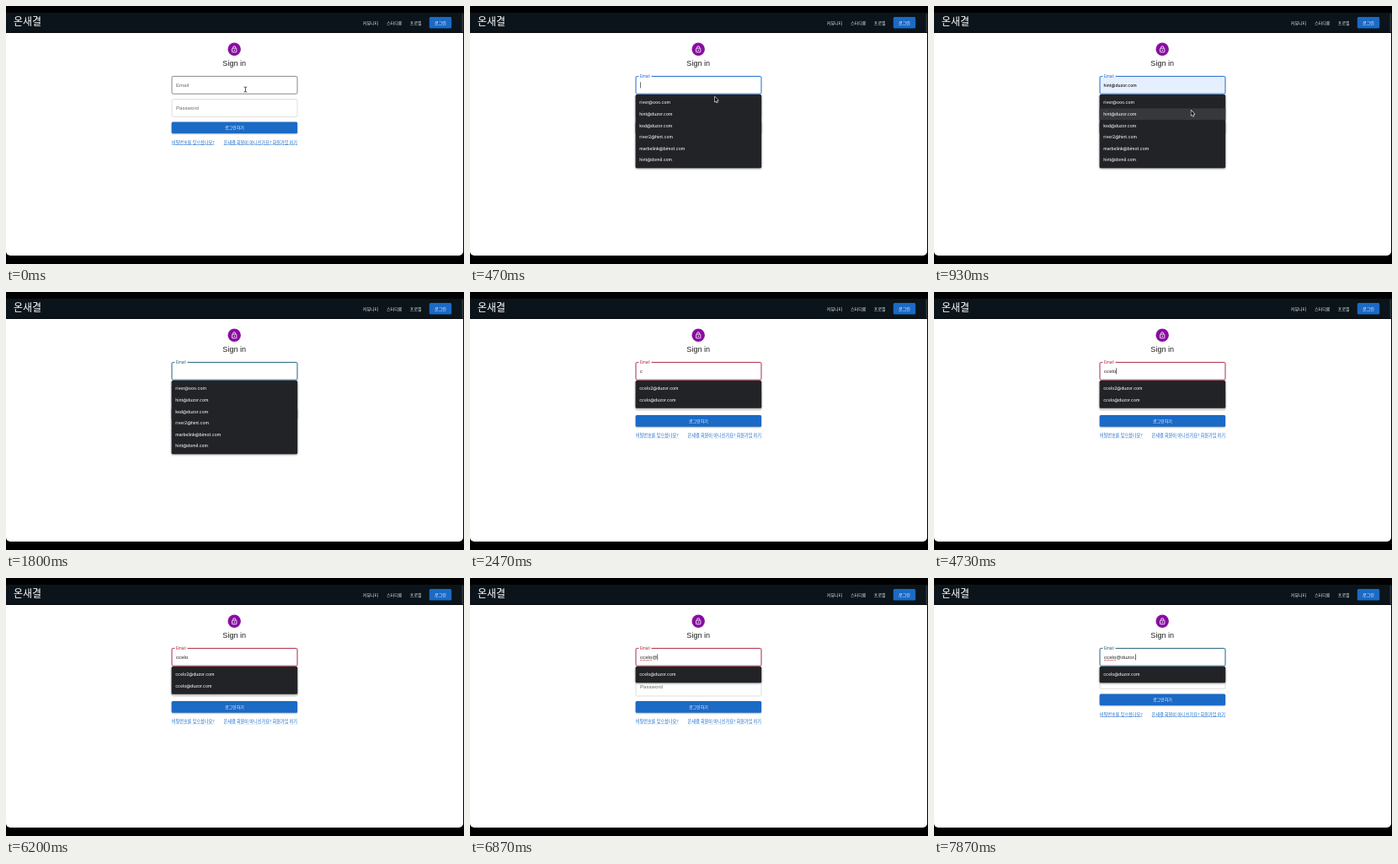
These frames come from a looping animation (544x306 px, 8000 ms). An HTML page with a canvas:

```html
<!DOCTYPE html>
<html lang="ko">
<head>
<meta charset="utf-8">
<title>Sign in</title>
<style>
html, body { margin: 0; width: 100%; height: 100%; overflow: hidden; background: #000; }
canvas { display: block; width: 544px; height: 306px; }
</style>
</head>
<body>
<canvas id="stage"></canvas>
<script>
const W = 544, H = 306, LOOP = 8000;
const canvas = document.getElementById('stage');
const ctx = canvas.getContext('2d');
const ratio = window.devicePixelRatio || 1;
canvas.width = W * ratio;
canvas.height = H * ratio;

const LATIN = '"Liberation Sans", Arial, sans-serif';
const MENU = 'Inter, "Liberation Sans", sans-serif';
const HANGUL = '"Noto Sans CJK KR", "Noto Sans CJK", sans-serif';
const BLUE = '#1b6ac6', TEAL = '#23627a', RED = '#ad2944';

const FOCUS = 270, OPEN = 330, REFRESH = 1670, FILTER = 1900;
const ERROR_ON = 2470, ERROR_OFF = 7750, SHIFT = 8.6;
const ADDRESS = 'ccelo@duzor.';
const KEYS = [1870, 2870, 3130, 4530, 4690, 6860, 7200, 7270, 7530, 7670, 7730, 7860];
const ALL = ['river@ooo.com', 'hint@duzor.com', 'ked@duzor.com',
  'river2@hint.com', 'marbelink@bimot.com', 'hint@domil.com'];
const MATCHES = ['ccelo2@duzor.com', 'ccelo@duzor.com'];
const FIELD = { x: 197, y: 83.4, w: 149, h: 20.8 };
const ROW = 13.6, MENU_TOP = 105;

// Pointer stops: time, x, y
const PATH = [[270, 284, 99], [480, 291, 108], [700, 302, 121], [930, 305, 124],
  [1000, 334, 118], [1070, 368, 110], [1200, 400, 108], [1330, 406, 108]];

const ease = p => p * p * (3 - 2 * p);
const clamp = v => Math.max(0, Math.min(1, v));
const mix = (a, b, p) => a + (b - a) * p;

function text(str, x, y, size, color, family = LATIN, opt = {}) {
  ctx.font = `${opt.weight || 400} ${size}px ${family}`;
  ctx.letterSpacing = (opt.spacing || 0) + 'px';
  ctx.textAlign = opt.align || 'left';
  ctx.textBaseline = 'alphabetic';
  ctx.fillStyle = color;
  ctx.fillText(str, x, y);
  return ctx.measureText(str).width;
}

function box(x, y, w, h, r, fill, stroke, line = 1) {
  ctx.beginPath();
  ctx.roundRect(x, y, w, h, r);
  if (fill) { ctx.fillStyle = fill; ctx.fill(); }
  if (stroke) { ctx.strokeStyle = stroke; ctx.lineWidth = line; ctx.stroke(); }
}

function withShadow(color, blur, dy, draw) {
  ctx.save();
  ctx.shadowColor = color;
  ctx.shadowBlur = blur * ratio;
  ctx.shadowOffsetY = dy * ratio;
  draw();
  ctx.restore();
}

function pointerAt(t) {
  if (t <= PATH[0][0]) return { x: PATH[0][1], y: PATH[0][2] };
  const i = PATH.findIndex(p => p[0] > t);
  if (i < 0) { const end = PATH[PATH.length - 1]; return { x: end[1], y: end[2] }; }
  const a = PATH[i - 1], b = PATH[i], p = (t - a[0]) / (b[0] - a[0]);
  return { x: mix(a[1], b[1], p), y: mix(a[2], b[2], p) };
}

function drawPage() {
  ctx.fillStyle = '#000';
  ctx.fillRect(0, 0, W, H);
  box(0, 8, W - 1, 288, [0, 0, 5, 5], '#fff');
  ctx.fillStyle = '#0b141a';
  ctx.fillRect(0, 8, W, 24);
  ctx.fillStyle = '#30373c';
  ctx.fillRect(541.5, 9, 1.5, 22);
  ctx.fillStyle = '#04080b';
  ctx.fillRect(0, 31, W, 1);

  text('온새결', 9, 23.4, 12, '#fff', HANGUL);
  text('커뮤니티', 423.8, 21.7, 5, '#e9edef', HANGUL);
  text('스터디룸', 452, 21.7, 5, '#e9edef', HANGUL);
  text('프로필', 479.8, 21.7, 5, '#e9edef', HANGUL);
  box(502.8, 13, 26.4, 13.6, 1.5, BLUE);
  text('로그인', 516, 21.7, 5, '#fff', HANGUL, { align: 'center' });

  ctx.beginPath();
  ctx.arc(271.2, 51.3, 7.7, 0, Math.PI * 2);
  ctx.fillStyle = '#8a0ca2';
  ctx.fill();
  drawLock(271.2, 51.3);
  text('Sign in', 271.2, 71.4, 9.05, '#202020', LATIN, { align: 'center' });
}

function drawLock(x, y) {
  ctx.save();
  ctx.translate(x, y);
  box(-2.65, -1.15, 5.3, 4.6, 0.4, null, '#fff', 0.8);
  ctx.beginPath();
  ctx.moveTo(-1.5, -1.2);
  ctx.lineTo(-1.5, -2.2);
  ctx.arc(0, -2.2, 1.5, Math.PI, 0);
  ctx.lineTo(1.5, -1.2);
  ctx.lineWidth = 0.75;
  ctx.stroke();
  ctx.beginPath();
  ctx.arc(0, 1.15, 0.75, 0, Math.PI * 2);
  ctx.fillStyle = '#fff';
  ctx.fill();
  ctx.restore();
}

function link(str, x, y, align, faint) {
  const w = text(str, x, y, 5.15, BLUE, HANGUL, { align });
  ctx.fillStyle = `rgba(27,106,198,${faint ? 0.15 : 0.6})`;
  ctx.fillRect(align === 'right' ? x - w : x, y + 0.6, w, 0.7);
}

function drawForm(shift) {
  box(FIELD.x, 110.6 + shift, FIELD.w, 20.8, 1.5, '#fff', '#c8c8c8', 0.6);
  text('Password', 202, 122.8 + shift, 6.03, '#666', LATIN, { spacing: 0.057 });
  withShadow('rgba(0,0,0,.4)', 1.6, 0.7, () =>
    box(196.7, 137.5 + shift, 149.4, 13.6, 1.5, BLUE));
  text('로그인하기', 271.4, 146.2 + shift, 5, '#fff', HANGUL, { align: 'center', weight: 500 });
  link('비밀번호를 잊으셨나요?', 196.7, 163.7 + shift, 'left', shift);
  link('온새결 회원이 아니신가요? 회원가입 하기', 346, 163.7 + shift, 'right', shift);
}

function drawEmail(t, typed, preview, invalid) {
  const focused = t >= FOCUS;
  const accent = invalid ? RED : t >= REFRESH ? TEAL : BLUE;
  box(FIELD.x, FIELD.y, FIELD.w, FIELD.h, 1.5, preview ? '#e6effd' : '#fff',
    focused ? accent : '#555', focused ? 1 : 0.7);

  const lift = ease(clamp((t - FOCUS) / 200));
  if (lift > 0) {
    ctx.fillStyle = '#fff';
    ctx.fillRect(200.3, 82.5, 15.2 * lift, 1.7);
  }
  text('Email', 202, mix(95.9, 84.9, lift), mix(6.03, 4.52, lift),
    focused ? accent : '#666', LATIN, { spacing: 0.05 });

  if (preview) {
    text(preview, 201.5, 95.8, 5, '#111', MENU, { weight: 500 });
    return;
  }
  const str = ADDRESS.slice(0, typed);
  const width = text(str, 202, 95.9, 6.03, '#222', LATIN, { spacing: 0.057 });
  if (typed > 5) {
    ctx.fillStyle = '#d2444a';
    for (let x = 202; x < 215.5; x += 1.3) ctx.fillRect(x, 97.2, 0.85, 0.9);
  }
  const since = t - (typed ? KEYS[typed - 1] : FOCUS);
  if (focused && since % 1000 < 500) {
    ctx.fillStyle = '#111';
    ctx.fillRect(202 + width, 90.2, 0.6, 7.2);
  }
}

function drawMenu(options, hover) {
  const height = 5.6 + ROW * options.length;
  withShadow('rgba(0,0,0,.45)', 2.5, 0.8, () =>
    box(196.6, MENU_TOP, 149.6, height, 1.5, '#222326'));
  options.forEach((option, i) => {
    const mid = 114.6 + ROW * i;
    if (i === hover) {
      ctx.fillStyle = '#37383b';
      ctx.fillRect(196.6, mid - ROW / 2, 149.6, ROW);
    }
    text(option, 201.2, mid + 1.8, 5, '#eee', MENU, { weight: 500 });
  });
}

function drawPointer({ x, y }) {
  const overField = x > FIELD.x && x < 346 && y < 104;
  ctx.lineJoin = 'round';
  ctx.beginPath();
  if (overField) {
    ctx.moveTo(x - 1.4, y - 3);
    ctx.quadraticCurveTo(x + 0.4, y - 3, x + 0.4, y - 2);
    ctx.lineTo(x + 0.4, y + 2);
    ctx.quadraticCurveTo(x + 0.4, y + 3, x - 1.4, y + 3);
    ctx.moveTo(x + 2.2, y - 3);
    ctx.quadraticCurveTo(x + 0.4, y - 3, x + 0.4, y - 2);
    ctx.moveTo(x + 0.4, y + 2);
    ctx.quadraticCurveTo(x + 0.4, y + 3, x + 2.2, y + 3);
    ctx.strokeStyle = '#222';
    ctx.lineWidth = 0.8;
    ctx.stroke();
    return;
  }
  [[0, 0], [0, 6], [1.4, 4.8], [2.4, 7], [3.3, 6.6], [2.4, 4.4], [4.3, 4.4]]
    .forEach(([dx, dy]) => ctx.lineTo(x + dx, y + dy));
  ctx.closePath();
  ctx.strokeStyle = '#fff';
  ctx.lineWidth = 1.1;
  ctx.stroke();
  ctx.fillStyle = '#0a0a0a';
  ctx.fill();
}

function optionsAt(t, typed) {
  if (t < OPEN) return [];
  if (t < FILTER) return ALL;
  return typed > 5 ? MATCHES.slice(1) : MATCHES;
}

function render(t) {
  const typed = KEYS.filter(k => k <= t).length;
  const invalid = t >= ERROR_ON && t < ERROR_OFF;
  const options = optionsAt(t, typed);
  const pointer = pointerAt(t);
  const inMenu = t < REFRESH && pointer.x < 346 && pointer.y > 107.8;
  const hover = inMenu ? Math.floor((pointer.y - 107.8) / ROW) : -1;

  ctx.setTransform(ratio, 0, 0, ratio, 0, 0);
  drawPage();
  drawForm(invalid ? SHIFT : 0);
  drawEmail(t, typed, options[hover], invalid);
  if (options.length) drawMenu(options, hover);
  if (t < REFRESH) drawPointer(pointer);
}

function tick() {
  render(performance.now() % LOOP);
  requestAnimationFrame(tick);
}
tick();
</script>
</body>
</html>
```
